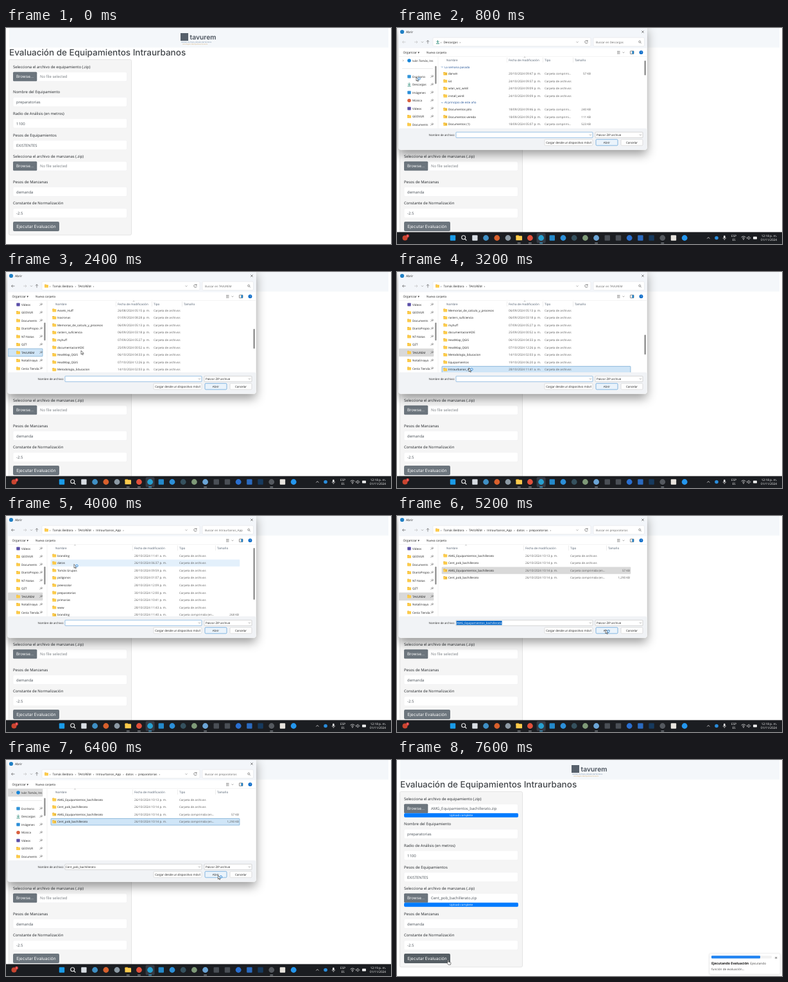
An HTML page that plays this animation: 600x338 px, repeating every 8 s.

```html
<!DOCTYPE html>
<html lang="es">
<head>
<meta charset="utf-8">
<title>Evaluación de Equipamientos Intraurbanos</title>
<style>
  html, body { margin: 0; width: 100%; height: 100%; overflow: hidden; background: #fff; }
  svg { display: block; width: 600px; height: 338px; }
  text { font-family: "Open Sans", "Noto Sans", sans-serif; text-rendering: geometricPrecision; white-space: pre; }
  .wide { font-family: Inter, sans-serif; }
</style>
</head>
<body>
<svg id="stage" viewBox="0 0 600 338" xmlns="http://www.w3.org/2000/svg"></svg>
<script>
const LOOP = 8000, ROW = 11.6, HEAD = 10.5, SIDE_ROW = 12.5;
const stage = document.getElementById('stage');

// Drawing helpers
const rect = (x, y, w, h, fill, more = '') =>
  `<rect x="${x}" y="${y}" width="${w}" height="${h}" fill="${fill}" ${more}/>`;
const dot = (x, y, r, fill, more = '') =>
  `<circle cx="${x}" cy="${y}" r="${r}" fill="${fill}" ${more}/>`;
const line = (d, stroke = '#444', w = 0.6, more = '') =>
  `<path d="${d}" fill="none" stroke="${stroke}" stroke-width="${w}" ${more}/>`;
const text = (x, y, s, size = 4.55, fill = '#1f1f1f', more = '') =>
  `<text x="${x}" y="${y}" font-size="${size}" fill="${fill}" ${more}>${s}</text>`;
const MID = 'text-anchor="middle"', END = 'text-anchor="end"';
const edge = (c, w = 0.6, r = 1.5) => `rx="${r}" stroke="${c}" stroke-width="${w}"`;

const folder = (x, y, zip) =>
  rect(x, y - 2.6, 3, 2, '#e5a823', 'rx=".5"') +
  rect(x, y - 2, 6, 4.4, '#fccb4c', 'rx=".6"') +
  (zip ? rect(x + 3.8, y - 1.2, 0.8, 2.6, '#b98a2c') : '');

// Page
const fields = [
  [100, 'Nombre del Equipamiento', 'preparatorias'],
  [133.5, 'Radio de Análisis (en metros)', '1100'],
  [167.5, 'Pesos de Equipamientos', 'EXISTENTES'],
  [240.5, 'Pesos de Manzanas', 'demanda'],
  [274, 'Constante de Normalización', '-2.5']
];

const label = (y, s) => text(11, y + 2.3, s, 5.95, '#212529');

const fileField = (y, name, file) =>
  label(y, name) +
  rect(11, y + 8, 177.5, 14.3, '#fff', edge('#ececee', 0.5, 2)) +
  rect(11, y + 7.8, 37.3, 14.5, '#6c757d', 'rx="1.5"') +
  text(16, y + 17.3, 'Browse...', 6.2, '#fff', 'class="wide"') +
  text(53, y + 17.3, file || 'No file selected', 5.95, file ? '#495057' : '#74797e') +
  (file ? rect(11, y + 22.3, 178, 6.4, '#007bff', 'rx="1.8"') +
    text(100, y + 27.1, 'Upload complete', 4.5, '#fff', MID) : '');

const toast = width =>
  rect(487, 303, 110, 32, '#fff', edge('#e4e4e4', 0.5, 2) + ' filter="url(#soft)"') +
  rect(490, 306.3, 94, 4.2, '#f1f1f1', 'rx="1"') +
  rect(490, 306.3, width, 4.2, '#1f83f2', 'rx="1"') +
  line('M589.2 308l3 3m0-3l-3 3', '#333', 0.7) +
  text(490, 319.6, 'Ejecutando Evaluación', 5.2, '#111', 'font-weight="700"') +
  text(550.3, 319.6, 'Ejecutando', 4.75, '#444') +
  text(490, 328.8, 'función de evaluación...', 4.7, '#444');

const page = s =>
  rect(0, 0, 600, 338, '#fff') +
  rect(5, 0, 591, 30.5, '#f4f7fa') +
  rect(272, 8, 12, 12, '#56606b') +
  text(286.5, 17.8, 'tavurem', 10.3, '#4a525c', 'class="wide" font-weight="600"') +
  text(273, 23, 'Instituto de Trazo y Estudio del Territorio', 2.5, '#5b7794') +
  text(275, 25.6, 'de la Región Metropolitana Poniente', 2.3, '#d0a15c') +
  text(5, 43.2, 'Evaluación de Equipamientos Intraurbanos', 13.5, '#43474b', 'class="wide" font-weight="500"') +
  rect(4.5, 49.5, 191, 274.5, '#f5f5f5', edge('#dfdfdf', 0.8, 2)) +
  fileField(61, 'Selecciona el archivo de equipamiento (.zip)', s.up1) +
  fileField(201, 'Selecciona el archivo de manzanas (.zip)', s.up2) +
  fields.map(([y, name, value]) =>
    label(y, name) +
    rect(11, y + 8.3, 177.5, 14.7, '#fff', edge('#ececee', 0.5, 2)) +
    text(16, y + 18, value, 5.95, '#495057')).join('') +
  rect(11, 303, 72, 15, s.press ? '#565e64' : '#6c757d', 'rx="2"') +
  text(47, 312.8, 'Ejecutar Evaluación', 6.65, '#fff', `class="wide" ${MID}`) +
  (s.toast ? toast(s.toast) : '');

// Open dialog
const sidebar = [
  ['Iván Tomás, Ins', '#1684d8'], null, ['Escritorio', '#3295d9'], ['Descargas', 'down'],
  ['Imágenes', '#2b8ed8'], ['Música', '#d9603f'], ['Videos', '#5a4fa8'], ['GEOVUR'],
  ['Documents'], ['DiarioPropio'], ['NT-Notas'], ['QZT'], ['TAVUREM'], ['NotaEnsayo'], ['Cesta Tienda']
];

const PREP = ['Tomás Beldora', 'TAVUREM', 'Intraurbanos_App', 'datos', 'preparatorias'];
const folders = {
  down: { path: ['Descargas'], top: 61, cols: [174, 230, 277, 302], sort: 199, thumb: [51, 23], rows: [
    '#La semana pasada', 'darwin|20/10/2024 09:47 p|57', '64|24/10/2024 09:37 p',
    'wlan_wiz_win8|24/10/2024 09:09 p', 'install_win8|24/10/2024 09:09 p',
    '#Al principio de este año', 'Documentos pilo|18/09/2024 09:46 p|240',
    'Documentos vereda|18/09/2024 09:29 p|111', 'Documentos (1)|18/09/2024 05:07 p|523'] },
  home: { path: PREP.slice(0, 2), cols: [174, 230, 277, 302], sort: 199, thumb: [51, 31], rows: [
    'Cartografia|02/07/2024 10:12 a', 'Indicadores|05/07/2024 01:40 p', 'Capas_base|11/07/2024 09:25 a',
    'Manzanas|18/07/2024 04:31 p', 'Movilidad|24/07/2024 12:08 p', 'Reportes|02/08/2024 11:50 a',
    'Plantillas|09/08/2024 03:17 p', 'Redes|20/08/2024 10:02 a',
    'Assets_Huff|26/08/2024 05:15 p', 'Isocronas|01/09/2024 08:28 p',
    'Memorias_de_calculo_y_procesos|06/09/2024 05:13 p', 'rasters_suficiencia|06/09/2024 03:18 p',
    'myhuff|07/09/2024 05:27 p', 'documentacionKDE|25/09/2024 00:52 a', 'HeatMap_QGIS|06/10/2024 04:33 p',
    'HeatMap_QGIS|07/10/2024 12:26 p', 'Metodologia_Educacion|14/10/2024 02:03 p',
    'Equipamientos|19/10/2024 06:20 p', 'Intraurbanos_App|28/10/2024 11:41 a'] },
  app: { path: PREP.slice(0, 3), thumb: [50, 81], rows: [
    'branding|28/10/2024 11:41 a', 'datos|26/10/2024 06:37 p', 'Tomás Grupos|28/10/2024 09:59 p',
    'poligonos|26/10/2024 01:07 p', 'preescolar|28/10/2024 12:09 p', 'preparatorias|30/10/2024 12:00 p',
    'primarias|26/10/2024 10:41 p', 'www|28/10/2024 11:43 a', 'branding|28/10/2024 11:40 a|268'] },
  data: { path: PREP.slice(0, 4), rows: [
    'preescolar|26/10/2024 10:09 p', 'preparatorias|26/10/2024 10:14 p', 'primarias|26/10/2024 10:41 p'] },
  prep: { path: PREP, rows: [
    'AMG_Equipamientos_bachillerato|26/10/2024 10:13 p', 'Cent_pob_bachillerato|26/10/2024 10:14 p',
    'AMG_Equipamientos_bachillerato|26/10/2024 10:14 p|57', 'Cent_pob_bachillerato|26/10/2024 10:14 p|1,290'] }
};
const WIDE = [200, 270, 329, 363];

const tones = {
  hover: ['#e3f0fb', '#e3f0fb'], pick: ['#cfe5f7', '#5c97c8'], gray: ['#d9d9d9', '#d9d9d9']
};
const mark = (x, y, w, h, tone) => rect(x, y - h / 2, w, h, tones[tone][0], edge(tones[tone][1], 0.6, 0.6));

function sideList(s) {
  return sidebar.map((item, i) => {
    const y = 51 + SIDE_ROW * (i - s.side);
    if (!item) return line(`M8 ${y}H56`, '#ddd');
    const [name, icon] = item;
    const lit = s.mark && s.mark[0] === i ? mark(3, y, 54, 12, s.mark[1]) : '';
    const pic = !icon ? folder(16, y)
      : icon === 'down' ? line(`M19 ${y - 3}v4m-2-2l2 2 2-2m-4.5 3.500h5`, '#2a8a78', 0.9)
      : i === 0 || i === 5 ? dot(19, y, 2.8, icon) : rect(16.3, y - 2.5, 5.4, 5, icon, 'rx=".8"');
    const pin = i ? line(`M52.500 ${y + 1.6}l1.500-1.500m-.8-1.700l2.500 2.500m-.9-3.400l1.800 1.800-1.600 1.100`, '#555', 0.7)
      : line(`M9 ${y - 1.3}l1.300 1.300-1.300 1.300`, '#777');
    return lit + pic + text(24, y + 1.7, name) + pin;
  }).join('');
}

function fileList(s, dir) {
  const [date, type, , size] = dir.cols || WIDE;
  const isHead = row => row?.[0] === '#';
  let next = (dir.top || 62) - s.scroll;
  return dir.rows.map((row, i) => {
    const y = next;
    next += isHead(row) || isHead(dir.rows[i + 1]) ? HEAD : ROW;
    if (isHead(row))
      return line(`M69 ${y - 0.7}l1.300 1.300 1.300-1.300`, '#2b6cb0') + text(74, y + 1.5, row.slice(1), 4.55, '#1d4f94');
    const [name, when, kb] = row.split('|');
    const kind = !kb ? 'Carpeta de archivos' : dir.cols ? 'Carpeta comprimi...' : 'Carpeta comprimida (en...';
    return (s.row && s.row[0] === i ? mark(70, y, 294, 10.4, s.row[1]) : '') +
      folder(72.3, y, kb) + text(80, y + 1.6, name) +
      text(date, y + 1.6, when + '. m.', 4.72, '#5c5c5c') + text(type, y + 1.6, kind, 4.5, '#5c5c5c') +
      (kb ? text(size, y + 1.6, kb + ' KB', 4.55, '#5c5c5c', END) : '');
  }).join('');
}

const button = (x, w, name, hot) =>
  rect(x, 174.3, w, 9.6, hot ? '#eaf3fb' : '#fdfdfd', edge(hot ? '#3a8bd0' : '#cfcfcf', 0.6)) +
  text(x + w / 2, 180.8, name, 4.5, '#1f1f1f', MID);

function dialog(s) {
  const dir = folders[s.dlg], cols = dir.cols || WIDE;
  const first = s.dlg === 'down', ink = first ? '#b5b5b5' : '#444';
  const crumbs = dir.path.map(p => `<tspan dx="3">${p}</tspan><tspan dx="3">›</tspan>`).join('');
  const thumb = dir.thumb, sort = dir.sort || 107.5;
  return rect(2.5, -4, 387, 194.5, '#fff', 'rx="4" filter="url(#drop)"') +
    rect(2.5, 0, 387, 31.5, '#f3f6fa') +
    dot(8, 6, 3.1, '#1f7fc4') + text(14, 7.8, 'Abrir', 4.8) +
    line('M381.300 4.300l3.400 3.400m0-3.400l-3.400 3.400', '#333') +
    line('M13.500 22h-5m2-2l-2 2 2 2', ink) + line('M27 22h5m-2-2l2 2-2 2', '#b5b5b5') +
    line('M38 21.300l1.500 1.500 1.500-1.500', '#777') + line('M48 24.500v-5m-2 2l2-2 2 2') +
    rect(56, 15, 246, 13.5, '#fff', edge('#dcdfe3', 0.5)) +
    (first ? line('M63.500 19v4m-2-2l2 2 2-2m-4.500 3.500h5', '#2a8a78', 0.9) : folder(60, 22)) +
    `<text x="68" y="23.700" font-size="4.650" fill="#1f1f1f">›${crumbs}</text>` +
    line('M279.500 21.300l1.500 1.500 1.500-1.500', '#777') +
    line('M297 20.500a2.300 2.300 0 1 0 .3 2m-.2-3.300v1.700h-1.700') +
    rect(306, 15, 79.5, 13.5, '#fff', edge('#dcdfe3', 0.5)) +
    text(310, 23.7, 'Buscar en ' + dir.path.at(-1), 4.45, '#666') +
    line('M376.700 21.500a1.500 1.500 0 1 0 3 0a1.500 1.500 0 1 0-3 0m2.500 1.100l1.700 1.700', '#555') +
    text(9.5, 40, 'Organizar ▾', 4.75) + text(46, 40, 'Nueva carpeta', 4.6) +
    line('M343 36.500h4.500m-4.500 1.800h4.500m-4.500 1.800h4.500', '#555') + line('M351.500 37.600l1.500 1.500 1.500-1.500', '#777') +
    rect(363.5, 36, 5.5, 4.6, '#fff', edge('#444', 0.6, 0.5)) + rect(366.5, 36, 2.5, 4.6, '#1f7fc4') +
    dot(380.5, 38.2, 2.9, '#0a6ac9') + text(380.5, 40, '?', 4.6, '#fff', MID) +
    line('M3 44.500H389', '#e8e8e8', 0.5) +
    `<g clip-path="url(#side)">${sideList(s)}</g>` +
    rect(59.3, 59.5 + 3.3 * s.side, 2.2, 28, '#8b8b8b', 'rx="1"') + line('M64 45V157', '#e4e4e4', 0.5) +
    ['Nombre', 'Fecha de modificación', 'Tipo', 'Tamaño'].map((h, i) =>
      text(i ? cols[i - 1] : 77, 51.5, h, 4.6, '#4c5a6b') +
      (i ? line(`M${cols[i - 1] - 2.5} 46v8`, '#dcdcdc', 0.5) : '')).join('') +
    line(`M${sort - 1.3} 46.300l1.300-1.100 1.300 1.100`, '#777', 0.5) +
    `<g clip-path="url(#files)">${fileList(s, dir)}</g>` +
    (thumb ? rect(385.6, thumb[0] + s.scroll * 0.4, 2.1, thumb[1], '#808080', 'rx="1"') : '') +
    rect(2.5, 157, 387, 33.5, '#f1f3f6', 'rx="3"') +
    text(90, 168.8, 'Nombre de archivo:', 4.4, '#1f1f1f', END) +
    rect(92, 163, 213, 8.7, '#fff', edge(s.file ? '#bdbdbd' : '#5a9bd5', 0.6, 0.8)) +
    (s.held ? rect(92.6, 164, 71, 6.6, '#0a6ac9') : '') +
    text(93, 168.8, s.file, 4.5, s.held ? '#fff' : '#1f1f1f') +
    line('M300 166.600l1.400 1.400 1.400-1.400', '#666') +
    rect(309, 163, 74, 8.7, '#fff', edge('#bdbdbd', 0.6, 0.8)) +
    text(311, 168.8, 'Pakzor ZIP archive', 4.5) + line('M378 166.600l1.400 1.400 1.400-1.400', '#666') +
    button(230, 75, 'Cargar desde un dispositivo móvil') + button(310, 34, 'Abrir', true) + button(349, 34, 'Cancelar');
}

// Taskbar: c = circle, s = square, then the colour
const apps = ('s#1a9be8 find s#d8dde3 c#3f8fc4 c#d8602c c#8d9aa5 dir c#e2503b c#27a0d0 s#2489ca c#2c8fd8 ' +
  'c#35515e c#7f9a78 c#6ba5d6 s#4a4f56 s#4a4f56 c#2a6fd0 s#2b6bc0 s#173a5e c#55595f s#e8e4de c#2496ed').split(' ');

const icon = (kind, i) => {
  const x = 87 + i * 17.2, y = 328.5, color = kind.slice(1);
  const lit = i === 8 ? rect(x - 7, 321, 14, 15.5, '#343a44', 'rx="2"') : '';
  const under = [6, 7, 8, 13, 19].includes(i) ? rect(x - 2.5, 336, 5, 1, i === 8 ? '#4cc2ff' : '#9aa0a6', 'rx=".5"') : '';
  const pic = kind === 'find' ? line(`M${x - 3.5} ${y - 0.8}a3 3 0 1 0 6 0a3 3 0 1 0-6 0M${x + 1.7} ${y + 1.5}l2.500 2.500`, '#e8e8e8', 1.1)
    : kind === 'dir' ? `<g transform="translate(${x - 4.8} ${y})scale(1.600)">${folder(0, 0)}</g>`
    : kind[0] === 'c' ? dot(x, y, 4.4, color) : rect(x - 4.2, y - 4.2, 8.4, 8.4, color, 'rx="1"');
  return lit + pic + under;
};

const taskbar = s =>
  rect(0, 319.4, 600, 18.6, '#1b1d21') +
  dot(12.5, 328.5, 4, '#c9452f') + dot(16.5, 325.5, 2.4, '#e04040') + text(16.5, 327, '1', 3.8, '#fff', MID) +
  apps.map(icon).join('') +
  line('M483.300 329.500l2-2 2 2', '#eee', 0.8) + dot(498, 328.5, 2.8, '#2a8ddb') +
  rect(509, 324.7, 2.6, 4.4, '#eee', 'rx="1.300"') + line('M508 328a2.300 2.300 0 0 0 4.600 0m-2.300 2.300v1.700', '#eee') +
  text(525, 327, 'ESP', 4.6, '#fff', MID) + text(525, 333.4, 'ES', 4.6, '#fff', MID) +
  line('M536.700 327.500a4.500 4.500 0 0 1 6.600 0m-5.100 1.700a2.500 2.500 0 0 1 3.600 0', '#eee', 0.8) + dot(540, 330.8, 0.8, '#eee') +
  line('M545.500 327.500h1.300l1.800-1.500v5l-1.800-1.500h-1.300zm4.500-.5a2 2 0 0 1 0 3', '#eee') +
  rect(555, 326.5, 6, 4, '#eee', 'rx=".8"') +
  text(592, 327, `12:${s.min} p. m.`, 4.7, '#fff', END) + text(592, 333.4, '01/11/2024', 4.7, '#fff', END);

// Pointer
const pointers = {
  hand: 'M0 0c.9-.5 1.400 0 1.400.7v2.300l2.500.6c.9.2 1.200.7 1 1.500l-.5 2.200h-3.300l-2.300-2.700c.1-.8.7-.8 1.200-.3z',
  arrow: 'M0 0v6l1.400-1.300 1 2.100.9-.4-1-2.100h1.900z'
};
const pointer = ([kind, x, y]) =>
  `<g transform="translate(${x} ${y})"><path d="${pointers[kind === 'hand' ? kind : 'arrow']}" fill="#fff" stroke="#222" stroke-width=".6"/>` +
  (kind === 'busy' ? dot(4.4, 2.4, 1.7, '#fff', 'stroke="#2a86d8" stroke-width="1"') : '') + '</g>';

// Each step changes only what it names.
const AMG = 'AMG_Equipamientos_bachillerato', CENT = 'Cent_pob_bachillerato';
const base = { dlg: '', side: 0, mark: null, scroll: 0, row: null, file: '', held: false,
  cur: null, up1: '', up2: '', press: false, toast: 0, min: 18 };
const steps = [
  [0, {}],
  [400, { cur: ['hand', 34, 84] }],
  [600, { cur: ['hand', 30, 76] }],
  [800, { dlg: 'down', cur: ['busy', 30, 77] }],
  [1000, { cur: ['arrow', 33, 104] }],
  [1200, { side: 3, cur: ['arrow', 36, 126], mark: [9, 'hover'] }],
  [1400, { cur: ['hand', 37, 137.5], mark: [10, 'hover'] }],
  [1600, { side: 6, mark: [13, 'hover'] }],
  [1800, { cur: ['arrow', 37, 126], mark: [12, 'hover'] }],
  [2000, { dlg: 'home', mark: [12, 'pick'], cur: ['busy', 44, 126] }],
  [2200, { cur: ['arrow', 96, 125], scroll: 48 }],
  [2400, { cur: ['arrow', 117, 123], scroll: 94.8 }],
  [2600, { scroll: 118, row: [16, 'hover'] }],
  [2800, { cur: ['arrow', 114, 138], row: [17, 'hover'] }],
  [3000, { cur: ['arrow', 112, 150], row: [18, 'hover'] }],
  [3200, { row: [18, 'pick'], mark: [12, 'gray'], cur: ['busy', 112, 150] }],
  [3400, { dlg: 'app', scroll: 0, row: [7, 'hover'], cur: ['arrow', 112, 144] }],
  [3600, { cur: ['arrow', 110, 107], row: [4, 'hover'] }],
  [3800, { cur: ['arrow', 106, 78], row: [1, 'hover'] }],
  [4000, { cur: ['busy', 106, 75.5] }],
  [4200, { dlg: 'data' }],
  [4400, { cur: ['busy', 106, 75] }],
  [4600, { dlg: 'prep', cur: ['arrow', 108, 78] }],
  [4800, { cur: ['arrow', 118, 85], row: [2, 'hover'] }],
  [5000, { row: [2, 'pick'], file: AMG, cur: ['arrow', 240, 140] }],
  [5200, { row: [2, 'gray'], held: true, cur: ['busy', 325, 178] }],
  [5400, { dlg: '', up1: AMG + '.zip', cur: ['arrow', 300, 182] }],
  [5600, { cur: ['arrow', 120, 205] }],
  [5800, { cur: ['hand', 30, 214], min: 19 }],
  [6000, { dlg: 'prep', side: 0, mark: [0, 'gray'], row: null, file: '', held: false, cur: ['arrow', 60, 160] }],
  [6200, { cur: ['arrow', 112, 96], row: [3, 'pick'], file: CENT }],
  [6400, { cur: ['busy', 330.5, 180.5] }],
  [6600, { dlg: '', up2: CENT + '.zip', cur: ['arrow', 318, 190] }],
  [6800, { cur: ['arrow', 190, 262] }],
  [7000, { cur: ['hand', 79, 313], press: true }],
  [7200, { toast: 32 }],
  [7400, { toast: 76 }]
];
let last = base;
const timeline = steps.map(([at, change]) => [at, last = { ...last, ...change }]);

const defs = `<defs>
  <clipPath id="side"><rect x="3" y="45" width="55" height="112"/></clipPath>
  <clipPath id="files"><rect x="64" y="54" width="321" height="103"/></clipPath>
  <filter id="drop" x="-10%" y="-10%" width="120%" height="130%"><feDropShadow dx="0" dy="7" stdDeviation="8" flood-opacity=".4"/></filter>
  <filter id="soft" x="-10%" y="-20%" width="120%" height="140%"><feDropShadow dx="0" dy=".5" stdDeviation="1.500" flood-opacity=".15"/></filter>
</defs>`;

const draw = s => defs + page(s) + (s.dlg ? dialog(s) + taskbar(s) : '') + (s.cur ? pointer(s.cur) : '');

let shown = null;
const start = performance.now();
function tick() {
  const t = (performance.now() - start) % LOOP;
  const state = timeline.findLast(([at]) => at <= t)[1];
  if (state !== shown) stage.innerHTML = draw(shown = state);
  requestAnimationFrame(tick);
}
tick();
</script>
</body>
</html>
```
